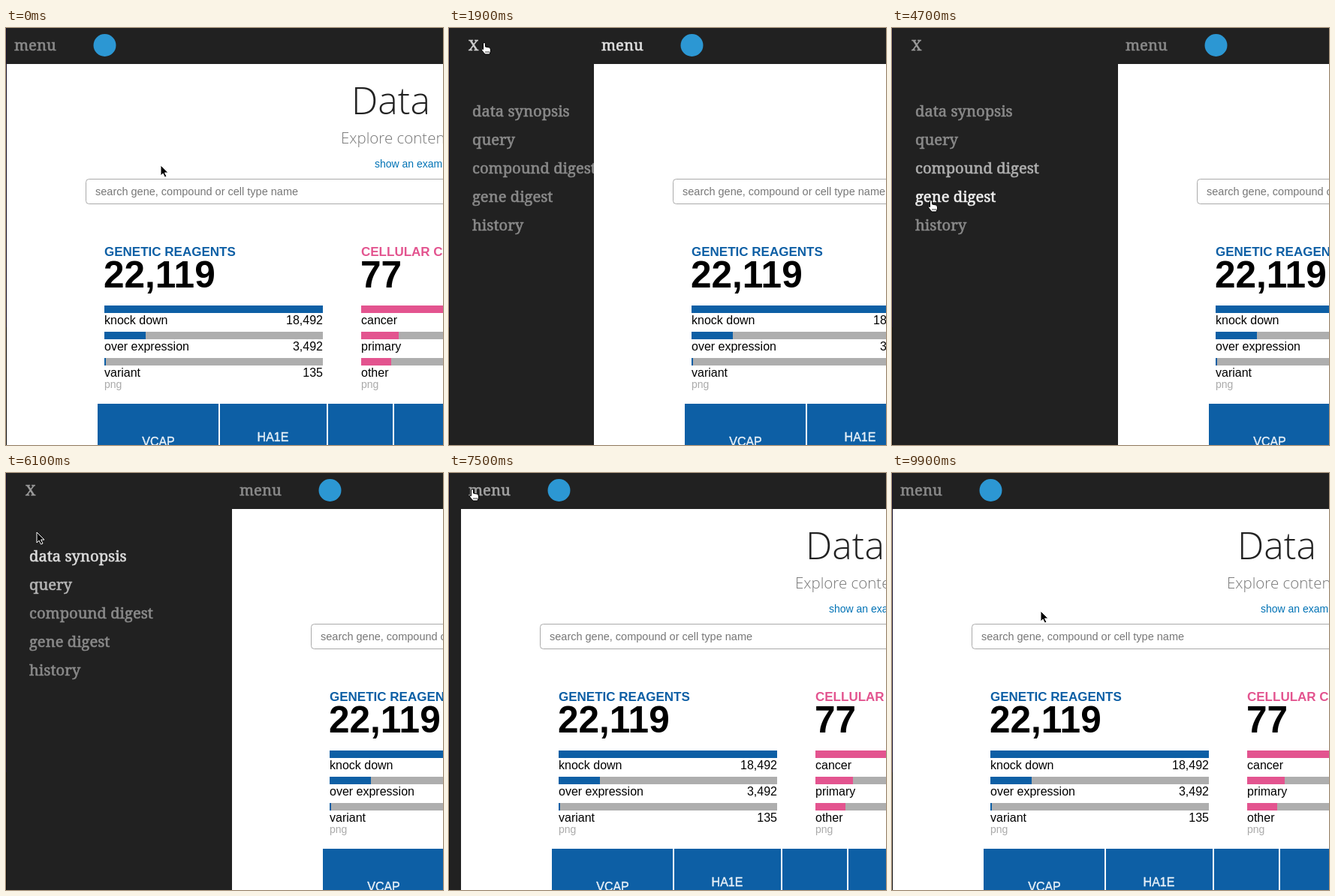
Recreate the animation shown at these times as an HTML page. Size 582 px wide and 556 px high, loop 10000 ms.

```html
<!DOCTYPE html>
<html lang="en">
<head>
<meta charset="utf-8">
<title>Sliding menu</title>
<style>
  html, body { margin: 0; width: 100%; height: 100%; overflow: hidden; background: #fff; }
  svg { display: block; font-family: "Liberation Sans", Arial, sans-serif; }
  .slab { font-family: "Noto Serif", serif; font-size: 20.2px; stroke-width: .6px; }
  .light { font-family: "Open Sans", sans-serif; font-weight: 300; }
  .bold { font-weight: 700; }
  .cell { text-anchor: middle; stroke: #e8f1f8; stroke-width: .4px; }
</style>
</head>
<body>
<svg id="stage" width="582" height="556" viewBox="0 0 582 556"></svg>
<script>
const BLUE = '#0d5fa5', PINK = '#e3548f', DARK = '#212121';
const LOOP = 10000, WIDTH = 300, SLIDE = 350, OPEN = 1771, CLOSE = 7248, FADE = 250;
const ROW = 38, BAR = 291;

const rect = (x, y, w, h, fill, more = '') =>
  `<rect x="${x}" y="${y}" width="${w}" height="${h}" fill="${fill}" ${more}/>`;
const text = (x, y, size, fill, str, more = '') =>
  `<text x="${x}" y="${y}" font-size="${size}" fill="${fill}" ${more}>${str}</text>`;
const link = (id, x, y, str) => `<text id="${id}" class="slab" x="${x}" y="${y}">${str}</text>`;

function panel(x, color, title, total, rows) {
  const bars = rows.map(([label, value, w], i) => {
    const y = 370 + 35 * i;
    return rect(x, y, BAR, 10, '#aeaeae') + rect(x, y, w, 10, color) +
      text(x, y + 25, 16, '#000', label) +
      text(x + BAR, y + 25, 16, '#000', value, 'text-anchor="end"');
  }).join('');
  return text(x, 304, 17, color, title, 'class="bold"') +
    text(x - 1, 346, 49.5, '#000', total, 'class="bold"') + bars +
    text(x, 480, 14, '#aaa', 'png');
}

const items = ['data synopsis', 'query', 'compound digest', 'gene digest', 'history'];
const sidebar = rect(0, 0, 582, 556, DARK) + link('close', 26, 30, 'X') +
  items.map((s, i) => link('item' + i, 31, 118 + ROW * i, s)).join('');

const page = rect(1, 0, 582, 556, '#fff') + rect(1, 0, 582, 48, DARK) +
  link('menu', 11, 30, 'menu') +
  '<circle cx="131.5" cy="23" r="15" fill="#2c97d3"/>' +
  text(460, 115, 50, '#222', 'Data', 'class="light"') +
  text(446, 154, 20.5, '#777', 'Explore content', 'class="light"') +
  text(491, 186, 14, '#0072b5', 'show an example') +
  rect(106.5, 201.5, 700, 33, '#fff', 'rx="4" stroke="#aaa"') +
  text(119, 223, 14.5, '#777', 'search gene, compound or cell type name') +
  panel(131, BLUE, 'GENETIC REAGENTS', '22,119',
    [['knock down', '18,492', BAR], ['over expression', '3,492', 55], ['variant', '135', 2]]) +
  panel(473, PINK, 'CELLULAR CONTEXTS', '77',
    [['cancer', '', BAR], ['primary', '', 50], ['other', '', 40]]) +
  rect(122, 501, 600, 60, BLUE) +
  [283, 427, 515].map(x => rect(x, 501, 2, 60, '#fff')).join('') +
  text(203, 557, 16, '#e8f1f8', 'VCAP', 'class="cell"') +
  text(355.5, 551, 16, '#e8f1f8', 'HA1E', 'class="cell"');

const $ = id => document.getElementById(id);
$('stage').innerHTML = sidebar + `<g id="page">${page}</g>` +
  rect(0, 0, 1, 399, '#17112b') + rect(0, 399, 1, 157, '#111') +
  `<g id="cursor" stroke-linejoin="round">
    <path id="arrow" d="M0 0V14L3 11 5.5 16 8 15 5.5 10H10Z" fill="#000" stroke="#fff"/>
    <g id="hand" fill="#fff" stroke="#000">
      <path d="M-1.5 1Q-1.5-.5 0-.5T1.5 1V5L6.5 6Q8.5 7 8.5 9V11L7 15H1L-4 9Q-4 7-1.5 8.5Z"/>
      <path d="M2 11v2m2-2v2m2-2v2" stroke-width=".8"/>
    </g>
  </g>`;

// pointer stops: time, x, y
const stops = [
  [0, 206, 183], [250, 206, 183], [1150, 47, 20], [2600, 47, 20], [3300, 57, 112],
  [3820, 56, 113], [4700, 52, 230], [4950, 51, 262], [5350, 51, 262], [6100, 41, 79],
  [6500, 31, 22], [8300, 31, 22], [9500, 198, 184], [LOOP, 198, 184]
];

const clamp = v => Math.min(1, Math.max(0, v));

// cubic-bezier(.25, .1, .25, 1)
function ease(p) {
  let lo = 0, hi = 1;
  const curve = (u, a, b) => 3 * u * (1 - u) ** 2 * a + 3 * u * u * (1 - u) * b + u ** 3;
  for (let i = 0; i < 14; i++) {
    const mid = (lo + hi) / 2;
    if (curve(mid, .25, .25) < p) lo = mid; else hi = mid;
  }
  return curve(lo, .1, 1);
}

const slide = (t, start) => ease(clamp((t - start) / SLIDE));
const offset = t => Math.round(WIDTH * (slide(t, OPEN) - slide(t, CLOSE)));

function pointer(t) {
  const i = stops.findIndex(s => s[0] > t);
  const [t0, x0, y0] = stops[i - 1], [t1, x1, y1] = stops[i];
  const p = (t - t0) / (t1 - t0);
  return [Math.round(x0 + (x1 - x0) * p), Math.round(y0 + (y1 - y0) * p)];
}

// id of the link under the pointer
function hovered(t) {
  const [x, y] = pointer(t), shift = offset(t);
  if (y < 38) {
    if (x >= shift + 10) return x < shift + 68 ? 'menu' : '';
    return 'close';
  }
  const row = Math.floor((y - 90) / ROW);
  return x < shift && items[row] ? 'item' + row : '';
}

const links = ['menu', 'close', ...items.map((_, i) => 'item' + i)];

function draw(t) {
  $('page').setAttribute('transform', `translate(${offset(t)})`);

  // a link glows by its share of the last FADE ms under the pointer
  const recent = Array.from({ length: 25 }, (_, k) => hovered(Math.max(0, t - k * FADE / 25)));
  for (const id of links) {
    const share = recent.filter(r => r === id).length / recent.length;
    const rest = id === 'close' ? 155 : 138;
    const v = Math.round(rest + (250 - rest) * share ** .6);
    $(id).style.fill = $(id).style.stroke = `rgb(${v},${v},${v})`;
  }

  $('cursor').setAttribute('transform', `translate(${pointer(t)})`);
  $('hand').style.display = recent[0] ? '' : 'none';
  $('arrow').style.display = recent[0] ? 'none' : '';
}

const begin = performance.now();
function tick() {
  draw((performance.now() - begin) % LOOP);
  requestAnimationFrame(tick);
}
tick();
</script>
</body>
</html>
```
